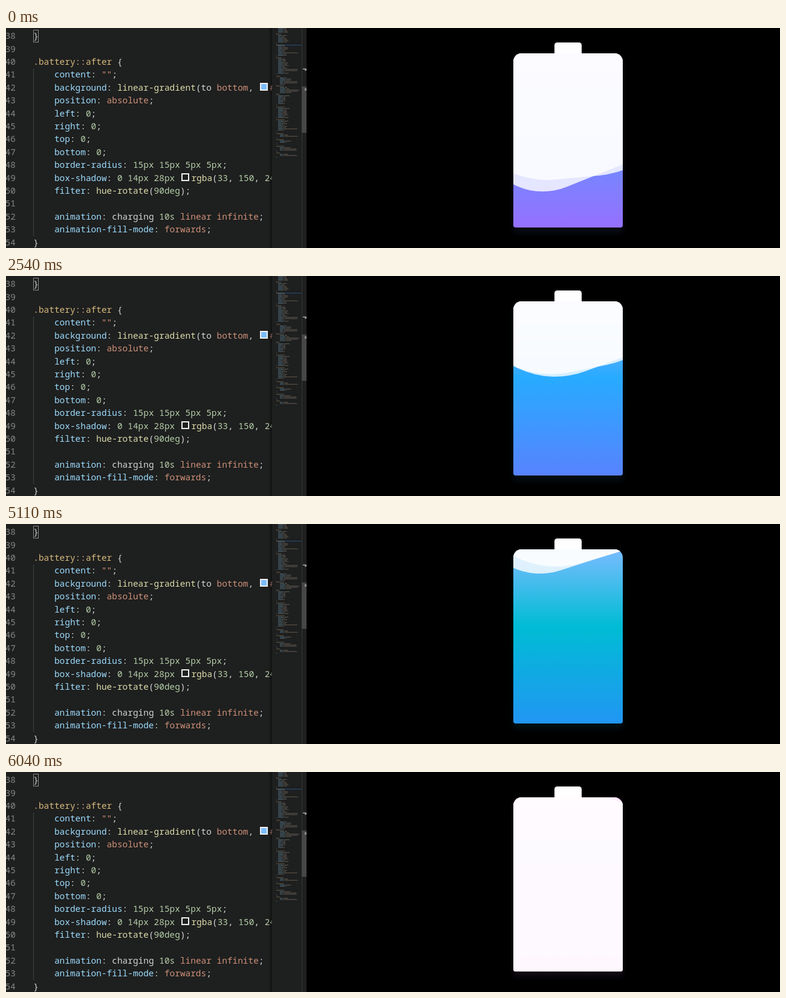
Write an HTML page with a canvas that moves like this. It is 1280x365 px and loops after 6120 ms.

```html
<!DOCTYPE html>
<html lang="en">
<head>
<meta charset="utf-8">
<title>Charging battery</title>
<style>
html, body { margin: 0; width: 100%; height: 100%; overflow: hidden; background: #000; }
canvas { display: block; width: 1280px; height: 365px; }
</style>
</head>
<body>
<canvas id="stage" width="1280" height="365"></canvas>
<script>
const ctx = document.getElementById('stage').getContext('2d');

const LOOP = 6120;
const BG = '#1e1f1f';

// ---------- code editor ----------
const CHAR = 8.664, ROW = 21.4, LEFT = 45.3, CODE_END = 440;
const COLORS = {
  s: '#d7ba7d', p: '#9cdcfe', v: '#ce9178', n: '#b5cea8', w: '#d4d4d4', f: '#dcdcaa'
};
// Each token starts with its colour key; "□" leaves room for a swatch.
const CODE = [
  ['w}'],
  [],
  ['s.battery::after ', 'w{'],
  ['p    content', 'w: ', 'v""', 'w;'],
  ['p    background', 'w: ', 'flinear-gradient', 'w(to ', 'vbottom', 'w, ', '□', 'v#'],
  ['p    position', 'w: ', 'vabsolute', 'w;'],
  ['p    left', 'w: ', 'n0', 'w;'],
  ['p    right', 'w: ', 'n0', 'w;'],
  ['p    top', 'w: ', 'n0', 'w;'],
  ['p    bottom', 'w: ', 'n0', 'w;'],
  ['p    border-radius', 'w: ', 'n15px 15px 5px 5px', 'w;'],
  ['p    box-shadow', 'w: ', 'n0 14px 28px ', '□', 'frgba', 'w(', 'n33', 'w, ', 'n150', 'w, ', 'n24'],
  ['p    filter', 'w: ', 'fhue-rotate', 'w(', 'n90deg', 'w);'],
  [],
  ['p    animation', 'w: charging ', 'n10s ', 'vlinear infinite', 'w;'],
  ['p    animation-fill-mode', 'w: ', 'vforwards', 'w;'],
  ['w}']
];

function rect(x, y, w, h, color) {
  ctx.fillStyle = color;
  ctx.fillRect(x, y, w, h);
}

function swatch(x, y, color) {
  rect(x, y, 13, 13, '#eee');
  rect(x + 2, y + 2, 9, 9, color);
}

function drawCode() {
  ctx.save();
  ctx.beginPath();
  ctx.rect(0, 0, CODE_END, 365);
  ctx.clip();
  ctx.font = '500 14.44px "Noto Sans Mono", monospace';
  rect(45, 67, 1, 278, '#404040');
  ctx.strokeStyle = '#888';
  ctx.lineWidth = 1;
  ctx.strokeRect(45.5, 3.5, 8, 20);

  CODE.forEach((tokens, i) => {
    const y = Math.round(18.2 + i * ROW);
    ctx.fillStyle = '#858585';
    ctx.fillText(String(38 + i), -1.3, y);
    let x = LEFT;
    for (const token of tokens) {
      if (token === '□') {
        swatch(Math.round(x + 2.5), y - 13, i === 4 ? '#7abcff' : BG);
        x += 18.5;
        continue;
      }
      const text = token.slice(1);
      ctx.fillStyle = COLORS[token[0]];
      ctx.fillText(text, x, y);
      x += text.length * CHAR;
    }
  });
  ctx.restore();
}

function drawMinimap() {
  let seed = 7;
  const rnd = () => (seed = seed * 16807 % 2147483647) / 2147483647;
  // top, bottom and indent of each block
  const blocks = [
    [0, 8, 3], [12, 24, 3], [30, 45, 3], [51, 75, 3], [82, 94, 6], [98, 108, 6],
    [112, 126, 3], [133, 148, 3], [154, 170, 3], [177, 181, 6], [187, 191, 6],
    [198, 203, 6], [209, 213, 6]
  ];
  rect(447, 28, 42, 1, '#264f78');
  ctx.globalAlpha = 0.4;
  for (const [top, bottom, indent] of blocks) {
    rect(447, top - 2.3, 5 + rnd() * 10, 1, '#d7ba7d');
    for (let y = top; y < bottom; y += 2.14) {
      const x = 447 + indent, key = 4 + rnd() * 6;
      const value = rnd() < 0.15 ? 22 : 2 + rnd() * 7;
      rect(x, y, key, 1, '#9cdcfe');
      rect(x + key + 1, y, Math.min(value, 488 - x - key), 1, '#c8b49c');
    }
    rect(447, bottom + 0.8, 1, 1, '#d4d4d4');
  }
  ctx.globalAlpha = 1;
}

function drawEditor() {
  rect(0, 0, 497, 365, BG);
  drawCode();
  const shade = ctx.createLinearGradient(434, 0, 440, 0);
  shade.addColorStop(0, 'rgba(0,0,0,0)');
  shade.addColorStop(1, 'rgba(0,0,0,.45)');
  rect(434, 0, 6, 365, shade);
  drawMinimap();
  rect(489, 0, 1, 365, '#353535');
  rect(489, 97, 8, 77, '#464646');
  rect(491, 67, 6, 2, '#8c8c8c');
  rect(494, 69, 3, 2, '#8c8c8c');
  rect(494, 100, 3, 4, '#8c8c8c');
}

// ---------- battery ----------
const BOX = { x: 839, y: 42, w: 181, h: 289 };
const MID = BOX.x + BOX.w / 2;
const RADII = [13.5, 13.5, 4, 4];
const STOPS = [[0, [122, 188, 255]], [0.44, [0, 188, 212]], [1, [33, 150, 243]]];
const WAVE = 360;
const WAVES = [
  { radii: [0.4, 0.39, 0.42, 0.42], from: 30 },
  { radii: [0.4, 0.29, 0.4, 0.3], from: 0 }
];

function hueRotate([r, g, b], deg) {
  const c = Math.cos(deg * Math.PI / 180), s = Math.sin(deg * Math.PI / 180);
  return [
    r * (.213 + .787 * c - .213 * s) + g * (.715 - .715 * c - .715 * s) + b * (.072 - .072 * c + .928 * s),
    r * (.213 - .213 * c + .143 * s) + g * (.715 + .285 * c + .140 * s) + b * (.072 - .072 * c - .283 * s),
    r * (.213 - .213 * c - .787 * s) + g * (.715 - .715 * c + .715 * s) + b * (.072 + .928 * c + .072 * s)
  ].map(v => Math.max(0, Math.min(255, Math.round(v))));
}

function colorAt(p) {
  const i = p < STOPS[1][0] ? 0 : 1;
  const [p0, a] = STOPS[i], [p1, b] = STOPS[i + 1];
  const k = (p - p0) / (p1 - p0);
  return a.map((v, n) => v + (b[n] - v) * k);
}

function fillGradient(hue) {
  const g = ctx.createLinearGradient(0, BOX.y, 0, BOX.y + BOX.h);
  for (let i = 0; i <= 50; i++) {
    g.addColorStop(i / 50, `rgb(${hueRotate(colorAt(i / 50), hue)})`);
  }
  return g;
}

function drawBattery(sec) {
  // The hue falls from 90 to 0 degrees, then swings back in the last half second.
  const hue = sec < 9.5 ? 90 * (1 - sec / 9.5) : 180 * (sec - 9.5);
  rect(497, 0, 783, 365, '#000');

  ctx.fillStyle = '#fefefe';
  ctx.beginPath();
  ctx.roundRect(907, 24, 45, 19, [4.5, 4.5, 0, 0]);
  ctx.fill();

  ctx.save();
  ctx.beginPath();
  ctx.roundRect(BOX.x, BOX.y, BOX.w, BOX.h, RADII);
  ctx.shadowColor = `rgba(${hueRotate([9, 188, 215], hue)},.08)`;
  ctx.shadowOffsetY = 9;
  ctx.shadowBlur = 9;
  ctx.fillStyle = fillGradient(hue);
  ctx.fill();
  ctx.shadowColor = 'transparent';
  ctx.clip();

  ctx.fillStyle = 'rgba(255,255,255,.8)';
  for (const { radii, from } of WAVES) {
    const turn = from + (360 - from) * sec / 10;
    ctx.save();
    ctx.translate(MID, 227.5 - 36.2 * sec);
    ctx.rotate(turn * Math.PI / 180);
    ctx.beginPath();
    ctx.roundRect(-WAVE / 2, -WAVE / 2, WAVE, WAVE, radii.map(r => r * WAVE));
    ctx.fill();
    ctx.restore();
  }
  ctx.restore();
}

// ---------- timing ----------
// Runs of evenly spaced picture changes: first, last, count.
const RUNS = [
  [70, 680, 9], [770, 1380, 9], [1450, 1990, 8], [2090, 2690, 9], [2770, 3160, 6],
  [3230, 3380, 3], [3460, 4010, 8], [4090, 4630, 8], [4720, 5260, 8],
  [5350, 5490, 3], [5590, 5950, 6]
];
const TIMES = [0];
for (const [a, b, n] of RUNS) {
  for (let i = 0; i < n; i++) TIMES.push(Math.round((a + (b - a) * i / (n - 1)) / 10) * 10);
}
TIMES.push(6040);

const START = 4.39; // seconds into the ten second charge
let shown = -1;

function tick() {
  const t = performance.now() % LOOP;
  let step = TIMES.length - 1;
  while (TIMES[step] > t) step--;
  if (step !== shown) {
    drawBattery((START + TIMES[step] / 1000) % 10);
    shown = step;
  }
  requestAnimationFrame(tick);
}

drawEditor();
tick();
</script>
</body>
</html>
```
